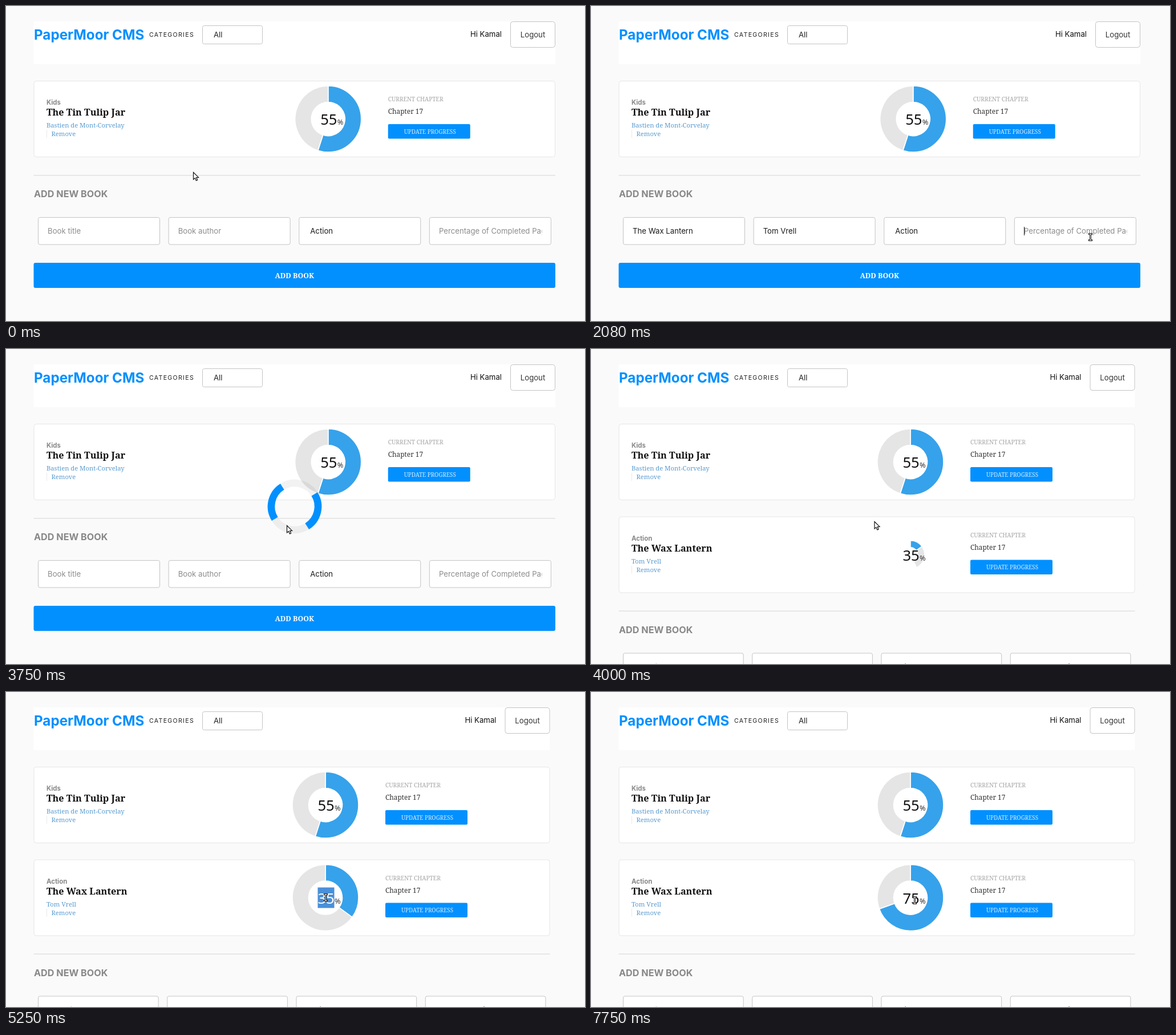
An HTML page with a canvas that plays this animation: 1015 by 552 pixels, repeating every 8 s.

```html
<!DOCTYPE html>
<html lang="en">
<head>
<meta charset="utf-8">
<title>Book list</title>
<style>
html, body { margin: 0; width: 100%; height: 100%; overflow: hidden; background: #fafafa; }
canvas { display: block; width: 1015px; height: 552px; }
</style>
</head>
<body>
<canvas id="stage"></canvas>
<script>
const canvas = document.getElementById('stage');
const ctx = canvas.getContext('2d');
const ratio = window.devicePixelRatio || 1;
canvas.width = 1015 * ratio;
canvas.height = 552 * ratio;

const LOOP = 8000, LEFT = 48.5, BLUE = '#0290ff';
const SANS = 'Inter, sans-serif', SLAB = '"Noto Serif", serif', DIGITS = '"Noto Sans", "Open Sans", sans-serif';
const BODY = '13.2px ' + SANS;
const BOOKS = [
  { genre: 'Kids', title: 'The Tin Tulip Jar', author: 'Bastien de Mont-Corvelay' },
  { genre: 'Action', title: 'The Wax Lantern', author: 'Tom Vrell' }
];

// The picture only changes at these times.
const run = (from, to, n) => Array.from({ length: n }, (_, i) => from + (to - from) * i / (n - 1));
const STEPS = [0, 80, ...run(250, 580, 5), ...run(1000, 1330, 5), ...run(1670, 2080, 6),
  3080, 3250, 3500, 3750, 4000, 4170, 4420, 4670, 4830, 5080, 5250, 5500, 5750,
  6250, 6500, 6670, 6920, 7170, 7420, 7750];

// time, x, y, pointer; positions between two marked glides are interpolated
const PATH = [
  [0, 328, 291, 'arrow'], [80, 319, 308, 'arrow', 1], [580, 180, 394, 'beam'],
  [1165, 180, 394, 'beam', 1], [1330, 429, 400, 'beam'],
  [1752, 429, 400, 'beam', 1], [1834, 284, 431, 'arrow', 1], [2080, 875, 404.5, 'beam'],
  [3080, 499, 477, 'arrow'], [3750, 492, 309, 'arrow'], [4000, 496.5, 302, 'arrow'],
  [4170, 507, 293, 'arrow'], [4420, 530, 282, 'arrow'], [4670, 560, 360, 'beam'],
  [5500, 561, 362, 'beam'], [5750, 567, 364.5, 'beam']
];

function text(str, x, y, font, color, align = 'left', spacing = 0) {
  ctx.font = font;
  ctx.fillStyle = color;
  ctx.textAlign = align;
  ctx.letterSpacing = spacing + 'px';
  ctx.fillText(str, x, y);
}

function rect(x, y, w, h, color) {
  ctx.fillStyle = color;
  ctx.fillRect(x, y, w, h);
}

function box(x, y, w, h, r, fill, line) {
  ctx.beginPath();
  ctx.roundRect(x, y, w, h, r);
  ctx.fillStyle = fill;
  ctx.fill();
  if (!line) return;
  ctx.strokeStyle = line;
  ctx.lineWidth = 1;
  ctx.stroke();
}

function slice(cx, cy, r, hole, a, b, color) {
  ctx.beginPath();
  ctx.arc(cx, cy, r, a, b);
  ctx.arc(cx, cy, hole, b, a, true);
  ctx.closePath();
  ctx.fillStyle = color;
  ctx.fill();
  ctx.strokeStyle = '#fff';
  ctx.lineWidth = 1.6;
  ctx.stroke();
}

function donut(cx, cy, percent, grow) {
  const top = -Math.PI / 2, turn = Math.PI * 2 * grow, mid = top + turn * percent / 100;
  slice(cx, cy, 58 * grow, 29.5 * grow, top, mid, '#36a2eb');
  slice(cx, cy, 58 * grow, 29.5 * grow, mid, top + turn, '#e5e5e5');
}

const easeOut = t => 1 - Math.pow(1 - Math.min(1, Math.max(0, t)), 4);

function secondChart(t) {
  if (t < 6500) return [35, easeOut(0.131 + (t - 4000) * 0.0012)];
  if (t < 7420) return [35 - 28 * easeOut(0.21 + (t - 6500) * 0.0008), 1];
  return [7 + 68 * easeOut(0.17 + (t - 7420) * 0.0009), 1];
}

function header(right) {
  rect(LEFT, 27, right - LEFT, 75, '#fff');
  text('PaperMoor CMS', 49, 59, 'bold 24.2px ' + SANS, BLUE);
  text('CATEGORIES', 251, 54, '10.6px ' + SANS, '#222', 'left', 1.3);
  box(344.5, 34.5, 105, 32, 3, '#fff', '#c4c4c4');
  text('All', 364, 55, BODY, '#222');
  text('Hi Kamal', right - 94, 54, BODY, '#111', 'right');
  box(right - 78.5, 27.5, 78, 45, 4, '#fff', '#c4c4c4');
  text('Logout', right - 39.5, 55, BODY, '#333', 'center');
}

function card(book, y, right, percent, grow, value, selected) {
  const cx = LEFT + (right - LEFT) / 2 + 59, col = cx + 105;
  box(49, y + .5, right - 49.5, 133, 4, '#fff', '#e6e6e6');
  text(book.genre, 71, y + 42, 'bold 11.4px ' + SANS, '#888');
  text(book.title, 71, y + 61, 'bold 16.2px ' + SLAB, '#111');
  text(book.author, 71, y + 82, '11.2px ' + SLAB, '#5a9bd0');
  rect(71, y + 86, 1, 14, '#e8e8e8');
  text('Remove', 79.5, y + 97, '11.2px ' + SLAB, '#5a9bd0');
  donut(cx, y + 67, percent, grow);
  if (selected) rect(cx - 13.5, y + 49, 29, 36, '#4a90d9');
  text(value, cx + 15.7, y + 77, '25.6px ' + DIGITS, selected ? '#fff' : '#111', 'right');
  text('%', cx + 16, y + 77, '12.8px ' + DIGITS, '#333');
  text('CURRENT CHAPTER', col, y + 36, '10.2px ' + SLAB, '#a5a5a5');
  text('Chapter 17', col, y + 58, '11.9px ' + SLAB, '#333');
  box(col, y + 76, 144, 25.5, 2, BLUE);
  text('UPDATE PROGRESS', col + 73.5, y + 92.5, '9.9px ' + SLAB, '#d8ecff', 'center');
  return cx;
}

function fields(t) {
  const typed = (str, from) => str.slice(0, Math.max(0, 5 * Math.floor((t - from) / 82 + 1.05)));
  if (t >= 3250) return ['', '', ''];
  return [typed(BOOKS[1].title, 1000), typed(BOOKS[1].author, 1670), t >= 3080 ? '35' : ''];
}

function form(t, dy, right) {
  const pitch = (right - LEFT) / 4, width = pitch - 15.6;
  rect(LEFT, 296 + dy, right - LEFT, 1.5, '#e2e2e2');
  text('ADD NEW BOOK', 49, 335 + dy, 'bold 16.2px ' + SANS, '#888');
  const [title, author, done] = fields(t);
  const values = [title, author, 'Action', done];
  const hints = ['Book title', 'Book author', '', 'Percentage of Completed Pages'];
  const focus = t < 580 || t >= 3080 ? -1 : t < 1330 ? 0 : t < 2080 ? 1 : 3;
  values.forEach((value, i) => {
    const x = LEFT + 8 + pitch * i, tx = x + (i === 2 ? 19.5 : 16.5);
    box(x, 370.5 + dy, width, 47.5, 3, '#fff', '#c4c4c4');
    ctx.save();
    ctx.beginPath();
    ctx.rect(x + 16, 371 + dy, width - 32, 46);
    ctx.clip();
    text(value || hints[i], tx, 399 + dy, BODY, value ? '#1a1a1a' : '#8c8c8c');
    if (i === focus) rect(Math.round(tx + (value ? ctx.measureText(value).width : 0)), 387, 1, 15, '#111');
    ctx.restore();
  });
  box(LEFT, 450 + dy, right - LEFT, 44, 3, BLUE);
  text('ADD BOOK', (LEFT + right) / 2, 477 + dy, 'bold 12.4px ' + SLAB, '#fff', 'center');
}

function spinner(t) {
  const turn = (13 + (t - 3750) * 0.18) * Math.PI / 180;
  const arc = (from, to, color) => {
    ctx.beginPath();
    ctx.arc(506, 276, 41, from, to);
    ctx.strokeStyle = color;
    ctx.lineWidth = 12.6;
    ctx.stroke();
  };
  for (let i = 0; i < 4; i++) {
    const a = turn + (i - .5) * Math.PI / 2;
    arc(a, a + Math.PI / 2, i % 2 ? 'rgba(0,0,0,.05)' : BLUE);
  }
}

function arrow(x, y) {
  const pts = [[.5, .5], [.5, 13], [3.4, 10.4], [5.4, 15], [7.6, 14], [5.7, 9.6], [9.5, 9.4]];
  ctx.beginPath();
  pts.forEach(([px, py]) => ctx.lineTo(x + px, y + py));
  ctx.closePath();
  ctx.fillStyle = '#fff';
  ctx.fill();
  ctx.strokeStyle = '#111';
  ctx.lineWidth = 1.2;
  ctx.stroke();
}

function beam(x, y) {
  rect(x - 3.5, y - 7, 7, 3, '#111');
  rect(x - 3.5, y + 4, 7, 3, '#111');
  rect(x - 1.5, y - 6, 3, 12, '#111');
  rect(x - 2.5, y - 6, 5, 1, '#fff');
  rect(x - 2.5, y + 5, 5, 1, '#fff');
  rect(x - .5, y - 6, 1, 12, '#fff');
}

function pointer(t) {
  const i = PATH.findLastIndex(p => p[0] <= t + .01);
  let [start, x, y, kind, glide] = PATH[i];
  if (glide) {
    const next = PATH[i + 1], k = (t - start) / (next[0] - start);
    x = Math.round(x + (next[1] - x) * k);
    y = Math.round(y + (next[2] - y) * k);
  }
  if (kind === 'beam') beam(Math.floor(x) + .5, Math.round(y));
  else arrow(x, y);
}

function draw(t) {
  const added = t >= 4000, right = added ? 953.5 : 963;
  ctx.setTransform(ratio, 0, 0, ratio, 0, 0);
  rect(0, 0, 1015, 552, '#fafafa');
  header(right);
  card(BOOKS[0], 131, right, 55, 1, '55');
  if (added) {
    const value = t < 6500 ? '35' : t < 7420 ? '7' : '75';
    card(BOOKS[1], 293.5, right, ...secondChart(t), value, t >= 5250 && t < 6500);
    if (t >= 5080 && t < 5250) rect(562, 343, 1, 36, '#111');
    if (t >= 6500 && t < 7750) rect(575, 343, 1.5, 36, '#111');
  }
  form(t, added ? 162.5 : 0, right);
  if (t >= 3250 && !added) spinner(t);
  pointer(t);
}

const begin = performance.now();
function tick() {
  const now = (performance.now() - begin) % LOOP;
  draw(STEPS.findLast(s => s <= now));
  requestAnimationFrame(tick);
}
tick();
</script>
</body>
</html>
```
